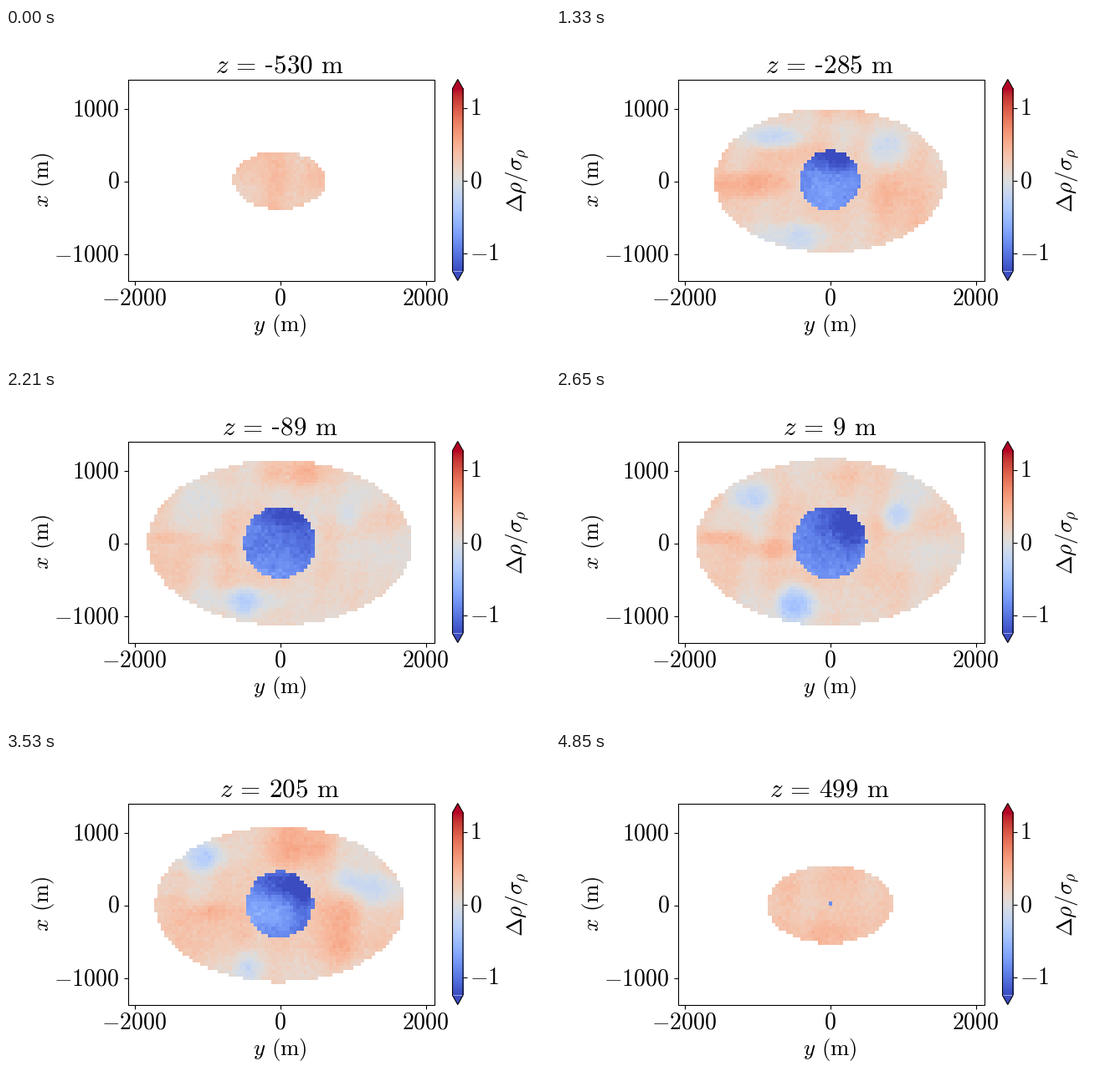
Write a matplotlib script that moves like this. It is 650 px wide and 400 px high and loops after 5070 ms.

```python
import numpy as np
import matplotlib.pyplot as plt
from matplotlib.animation import FuncAnimation

plt.rcParams["mathtext.fontset"] = "cm"

W, H, DPI = 650, 400, 100
TICK_MS, FIRST_MS, STEP_MS, STEPS = 10, 450, 220, 22
LOOP_MS = FIRST_MS + STEP_MS * (STEPS - 1)
X0, Y0 = 326.9, 183.0            # data origin on the stage
CELL, CELL_M = 4.256, 49         # cell size in pixels and metres
COLS, ROWS = 75, 47
LEFT, TOP = 168.05, 82.0
VMAX = 1.267
DEPTH_REACH = 170                # vertical radius of a patch in metres
CMAP = plt.get_cmap("coolwarm")

# Soft patches: x, y, z, radius x, radius y, strength
BODY_PATCHES = [
    (232, 187, -300, 50, 17, .32),
    (195, 177, 50, 32, 9, .26),
    (250, 191, 50, 40, 12, .26),
    (262, 133, -300, 30, 13, -.38),
    (232, 127, 120, 33, 19, -.5),
    (337, 98, -130, 40, 22, .32),
    (340, 108, 210, 44, 30, .38),
    (396, 148, -260, 24, 22, -.3),
    (407, 153, 80, 20, 17, -.4),
    (445, 166, 250, 40, 20, -.36),
    (405, 212, -290, 40, 28, .22),
    (402, 218, 190, 46, 40, .22),
    (286, 250, -220, 50, 18, -.34),
    (286, 258, 70, 21, 27, -.66),
    (326, 224, 360, 34, 30, .26),
    (235, 212, 200, 50, 28, .18),
]
CORE_PATCHES = [
    (330, 150, -250, 62, 20, -.46),
    (355, 162, 90, 28, 27, -.36),
    (325, 148, 60, 48, 26, -.22),
    (325, 158, 340, 46, 17, -.32),
    (356, 190, 340, 14, 36, -.34),
    (322, 192, -250, 23, 22, .13),
    (314, 196, 250, 24, 21, .2),
]

rng = np.random.default_rng(7)
WAVES = [(*rng.normal(0, .085, 2), rng.normal(0, .006), rng.uniform(0, 2 * np.pi))
         for _ in range(16)]

px, py = np.meshgrid(LEFT + CELL * (np.arange(COLS) + .5),
                     TOP + CELL * (np.arange(ROWS) + .5))
u, v = (px - X0) / CELL, (py - Y0) / CELL


def patches(items, z):
    total = 0
    for cx, cy, cz, rx, ry, strength in items:
        q = (((px - cx) / rx) ** 2 + ((py - cy) / ry) ** 2
             + ((z - cz) / DEPTH_REACH) ** 2)
        total = total + strength * np.exp(-q ** 1.6)
    return total


def density_slice(z):
    """Horizontal cut through an ellipsoid with a light spherical core."""
    ripple = .022 * sum(np.cos(a * px + b * py + c * z + d) for a, b, c, d in WAVES)
    grain = rng.normal(0, .03, px.shape)
    body = .15 + .17 * (z / 565) ** 2 + patches(BODY_PATCHES, z) + ripple + grain
    core = -.88 + patches(CORE_PATCHES, z) + ripple + 1.4 * grain
    in_core = u ** 2 + v ** 2 + (z / CELL_M) ** 2 < (500 / CELL_M) ** 2
    in_body = (u / 37.5) ** 2 + (v / 23.4) ** 2 + (z / 565) ** 2 < 1
    return np.ma.masked_where(~in_body, np.where(in_core, core, body))


depths = [-530 + CELL_M * k for k in range(STEPS)]
slices = [density_slice(z) for z in depths]

fig = plt.figure(figsize=(W / DPI, H / DPI), dpi=DPI, facecolor="white")
ax = fig.add_axes([0, 0, 1, 1])


def line(xs, ys, width=.8):
    return ax.plot(xs, ys, color="black", lw=width, solid_capstyle="butt",
                   solid_joinstyle="miter")[0]


def label(x, y, text, size=20, ha="center", rotation=0):
    return ax.text(x, y, text, fontsize=size, ha=ha, va="baseline",
                   rotation=rotation, rotation_mode="anchor")


field = ax.imshow(slices[0], cmap=CMAP, vmin=-VMAX, vmax=VMAX, aspect="auto",
                  interpolation="nearest",
                  extent=(LEFT, LEFT + COLS * CELL, TOP + ROWS * CELL, TOP))

# Plot frame, ticks and axis names
left, right, top, bottom = 145.5, 511.5, 61.5, 302.5
line([left, right, right, left, left], [top, top, bottom, bottom, top])
for k in (-1, 0, 1):
    x = 327.5 + 174 * k
    line([x, x], [bottom, bottom + 5])
    label(x - .5, 331, f"${2000 * k}$")
    y = 183.5 - 87 * k
    line([left - 5, left], [y, y])
    label(left - 10, y + 8.5, f"${1000 * k}$", ha="right")
label(327.5, 363, r"$y\hspace{0.38}(\mathrm{m})$", 19.3)
label(51, 182, r"$x\hspace{0.38}(\mathrm{m})$", 19.3, rotation=90)

# Colour bar with pointed ends
bar_l, bar_r, bar_t, bar_b = 533.5, 546, 72.5, 291.5
mid = (bar_l + bar_r) / 2
ax.imshow(np.linspace(1, 0, 256)[:, None], cmap=CMAP, aspect="auto",
          interpolation="nearest", extent=(bar_l, bar_r, bar_b, bar_t))
for base, tip, color in ((bar_t, top, CMAP(1.0)), (bar_b, bottom, CMAP(0.0))):
    ax.fill([bar_l, mid, bar_r], [base, tip, base], color=color, lw=0)
line([bar_l, mid, bar_r, bar_r, mid, bar_l, bar_l],
     [bar_t, top, bar_t, bar_b, bottom, bar_b, bar_t])
for k in (-1, 0, 1):
    y = 182.5 - 87 * k
    line([bar_r, bar_r + 5], [y, y])
    label(553.5, y + 9, f"${k}$", ha="left")
label(617, 182.5, r"$\Delta\rho/\sigma_\rho$", 19.6, rotation=90)

title = label(327, 53, "", 22.4)
hyphen = line([], [], 1.4)

ax.set_xlim(0, W)
ax.set_ylim(H, 0)
ax.axis("off")


def update(i):
    t = i * TICK_MS
    step = 0 if t < FIRST_MS else 1 + (t - FIRST_MS) // STEP_MS
    z = depths[step]
    digits = str(abs(z))
    gap = r"\hspace{0.38}" if z < 0 else ""
    title.set_text(rf"$z\hspace{{0.18}}=\hspace{{0.18}}{gap}"
                   rf"\mathrm{{{digits}}}\hspace{{0.38}}\mathrm{{m}}$")
    start = 310 + 7.8 * (3 - len(digits))
    hyphen.set_data([start, start + 8], [46, 46])
    hyphen.set_visible(z < 0)
    field.set_data(slices[step])
    return field, title, hyphen


anim = FuncAnimation(fig, update, frames=LOOP_MS // TICK_MS, interval=TICK_MS,
                     repeat=True, repeat_delay=0, cache_frame_data=False)
plt.show()
```
